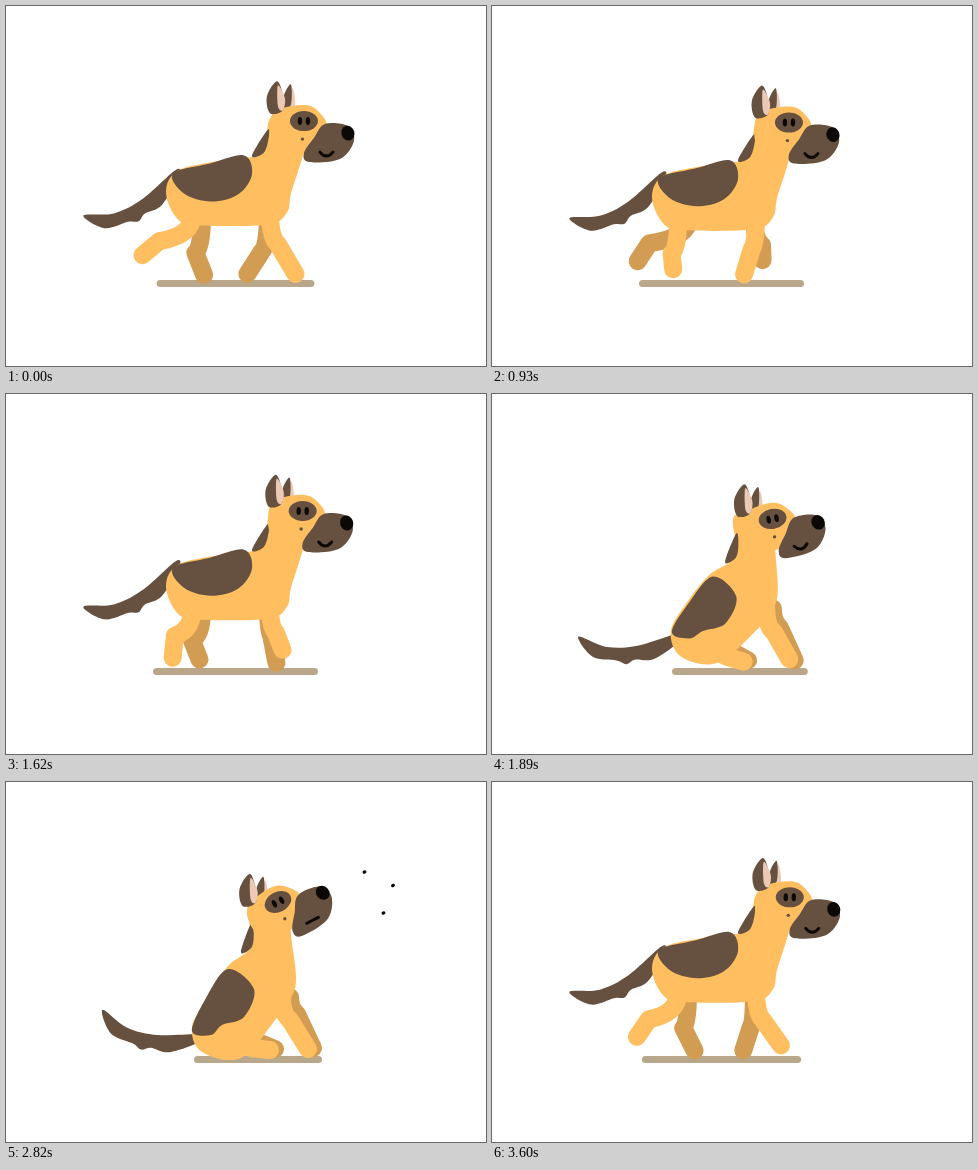
Write an HTML page with a canvas that moves like this. It is 480 px wide and 360 px high and loops after 3.63 s.

```html
<!DOCTYPE html>
<html lang="en">
<head>
<meta charset="utf-8">
<title>Dog</title>
<style>
html, body { margin: 0; width: 100%; height: 100%; overflow: hidden; background: #fff; }
canvas { display: block; }
</style>
</head>
<body>
<canvas id="stage" width="480" height="360"></canvas>
<script>
const ctx = document.getElementById('stage').getContext('2d');
const LOOP = 3630, STRIDE = 283, RAD = Math.PI / 180;
const TAN = '#ffbf60', FAR = '#d29c52', BROWN = '#66503f', PINK = '#ecc8b6', BLACK = '#0c0805', SHADE = '#b9a78b';

const lerp = (a, b, k) => a + (b - a) * k;
const mix = (a, b, k) => a.map((v, i) => lerp(v, b[i], k));
const ramp = (t, a, b) => {
  const k = Math.min(1, Math.max(0, (t - a) / (b - a)));
  return k * k * (3 - 2 * k);
};

// Outlines are points joined by a smooth closed curve.
const body = {
  stand: [266,110, 256,146, 215,154, 172,164, 160,186, 172,213, 195,219, 262,218, 281,206, 285,187, 296,152, 305,118],
  sit: [243,122, 246,163, 222,184, 202,216, 186,245, 196,270, 235,276, 270,237, 286,214, 290,194, 285,152, 284,118]
};
const saddle = {
  stand: [167,167, 204,157, 238,149, 246,168, 232,188, 205,195, 178,187],
  sit: [186,249, 200,216, 222,187, 248,207, 238,235, 216,243, 205,253]
};
const mane = [262,123, 246,149, 257,147, 262,135];
const tail = [8,1, -36,-2, -66,-12, -89,-32, -83,-8, -62,4, -54,11, -44,10, -26,16, 6,8];

// Keys: phase, joint, foot. The far leg runs ahead by `lead`.
const hind = {
  hip: [186, 210], farHip: 10, lead: .6, sitHip: [225, 252], sit: [245, 266, 264, 268],
  keys: [[0, 153,235, 136,249], [.286, 179,248, 180,263], [.37, 193,245, 207,268], [.6, 190,247, 199,269], [.77, 162,240, 156,262]]
};
const fore = {
  hip: [264, 205], farHip: -2, lead: .4, sitHip: [276, 215], sit: [284, 238, 302, 267],
  keys: [[0, 272,238, 290,268], [.17, 263,243, 264,269], [.4, 256,245, 241,268], [.686, 270,239, 270,254], [.8, 269,237, 288,259]]
};

function stride(keys, phase) {
  const p = phase - Math.floor(phase);
  let i = keys.length - 1;
  while (keys[i][0] > p) i--;
  const a = keys[i], b = keys[(i + 1) % keys.length];
  return mix(a, b, (p - a[0]) / ((b[0] || 1) - a[0])).slice(1);
}

function blob(p, color) {
  const n = p.length, v = i => p[(i + n) % n];
  ctx.beginPath();
  ctx.moveTo(p[0], p[1]);
  for (let i = 0; i < n; i += 2) {
    const out = j => v(j) + (v(j + 2) - v(j - 2)) / 6;
    const into = j => v(j + 2) - (v(j + 4) - v(j)) / 6;
    ctx.bezierCurveTo(out(i), out(i + 1), into(i), into(i + 1), v(i + 2), v(i + 3));
  }
  ctx.fillStyle = color;
  ctx.fill();
}
function line(path, color, width) {
  ctx.strokeStyle = color;
  ctx.lineWidth = width;
  ctx.stroke(new Path2D(path));
}
function oval(x, y, rx, ry, color, turn = 0) {
  ctx.fillStyle = color;
  ctx.beginPath();
  ctx.ellipse(x, y, rx, ry, turn, 0, 7);
  ctx.fill();
}
function group(dx, dy, draw) {
  ctx.save();
  ctx.translate(dx, dy);
  draw();
  ctx.restore();
}
function turnAbout(x, y, degrees) {
  ctx.translate(x, y);
  ctx.rotate(degrees * RAD);
  ctx.translate(-x, -y);
}

function drawLeg(kind, far, phase, w, drop, lean) {
  const sitLeg = far ? mix(kind.sit, kind.sit.map((v, i) => v + [7, -6, 5, -1][i]), 1) : kind.sit;
  const [jx, jy, fx, fy] = mix(stride(kind.keys, phase + far * kind.lead), sitLeg, w);
  const [hx, hy] = mix(kind.hip, kind.sitHip, w);
  const x = hx + far * lerp(kind.farHip, 8, w) + lean / 2;
  line(`M${x} ${hy + drop}Q${x} ${jy - 6} ${jx} ${jy}L${fx} ${fy}`, far ? FAR : TAN, 18);
}

function drawHead(x, y, tilt, earDrop, flat, closed) {
  group(x - 298, y - 115, () => {
    turnAbout(298, 115, tilt);
    const ears = draw => group(0, 0, () => {
      turnAbout(274, 106, -tilt);
      ctx.translate(0, earDrop);
      draw();
    });
    ears(() => {
      blob([286,82, 289,92, 288,102, 281,103], PINK);
      blob([285,78, 278,89, 277,106, 285,98], BROWN);
    });
    blob([264,115, 274,103, 300,99, 314,107, 320,122, 300,145, 268,140], TAN);
    ears(() => {
      blob([271,75, 261,90, 264,107, 277,104, 277,89], BROWN);
      blob([272,79, 279,92, 277,104, 272,100], PINK);
    });
    blob([319,118, 342,120, 348,135, 334,153, 303,156, 298,147, 308,132], BROWN);
    oval(342, 127, 6.5, 7.5, BLACK, -.3);
    const lip = 146 + flat;
    line(`M314 ${lip}Q320.5 ${154 - 7 * flat} 327 ${lip}`, BLACK, 3);
    oval(296.5, 133, 1.7, 1.7, BROWN);
    oval(298, 115, 14, 10, BROWN);
    for (const eye of [294, 302]) oval(eye, 115, lerp(2.2, 3, closed), lerp(4, 1, closed), BLACK);
  });
}

function draw(t) {
  const rise = ramp(t, 3250, 3470);
  const w = ramp(t, 1640, 1970) - rise;
  const late = ramp(t, 1690, 2010) - rise;
  const phase = (t < 2500 ? t : t - LOOP) / STRIDE;
  const drop = 6.7 * Math.sin(2 * Math.PI * (phase + .035)) ** 2 * (1 - w);
  const raise = ramp(t, 2250, 2430) - ramp(t, 2900, 3080);
  const sway = -4 * (1 - raise) * w;
  const lean = 6 * (ramp(t, 3350, 3460) - ramp(t, 3460, 3570));
  const wag = 5 * w * (Math.cos((t - 2490) / 440 * 2 * Math.PI) - 1);

  ctx.clearRect(0, 0, 480, 360);
  ctx.lineCap = ctx.lineJoin = 'round';

  const spread = Math.min(4, drop) - 3.5;
  line(`M${lerp(151, 188, w) - spread + sway / 2} 277.5H${lerp(308, 316, w) + spread}`, SHADE, 7);

  const leg = (kind, far) => drawLeg(kind, far, phase, w, drop, lean);
  leg(hind, 1);
  leg(fore, 1);

  group(lerp(163, 188, w) + sway + lean, lerp(169, 252, w) + drop / 2, () => {
    ctx.rotate((wag - 45 * (1 - late)) * RAD);
    blob(tail, BROWN);
  });
  group(sway + lean, drop, () => {
    blob(mix(body.stand, body.sit, w), TAN);
    blob(mix(saddle.stand, saddle.sit, w), BROWN);
    ctx.translate(-11 * w, 21 * w);
    turnAbout(246, 149, -12 * w);
    blob(mane, BROWN);
  });
  leg(hind, 0);
  leg(fore, 0);

  const seated = mix([273, 124, -16], [272, 120, -27], raise);
  const [x, y, tilt] = mix([298, 115, 0], seated, late);
  const dip = 16 * late * (1 - late);
  const closed = ramp(t, 3070, 3120) - ramp(t, 3180, 3230);
  drawHead(x + lean - .2 * drop, y + dip + .3 * drop, tilt, .55 * drop, raise, closed);

  if (t >= 2250 && t < 3260)
    for (const [px, py] of [[358.5, 90], [387, 103.5], [377.5, 131]]) oval(px, py, 2, 1.7, BLACK, -.5);
}

function tick() {
  draw(performance.now() % LOOP);
  requestAnimationFrame(tick);
}
tick();
</script>
</body>
</html>
```
